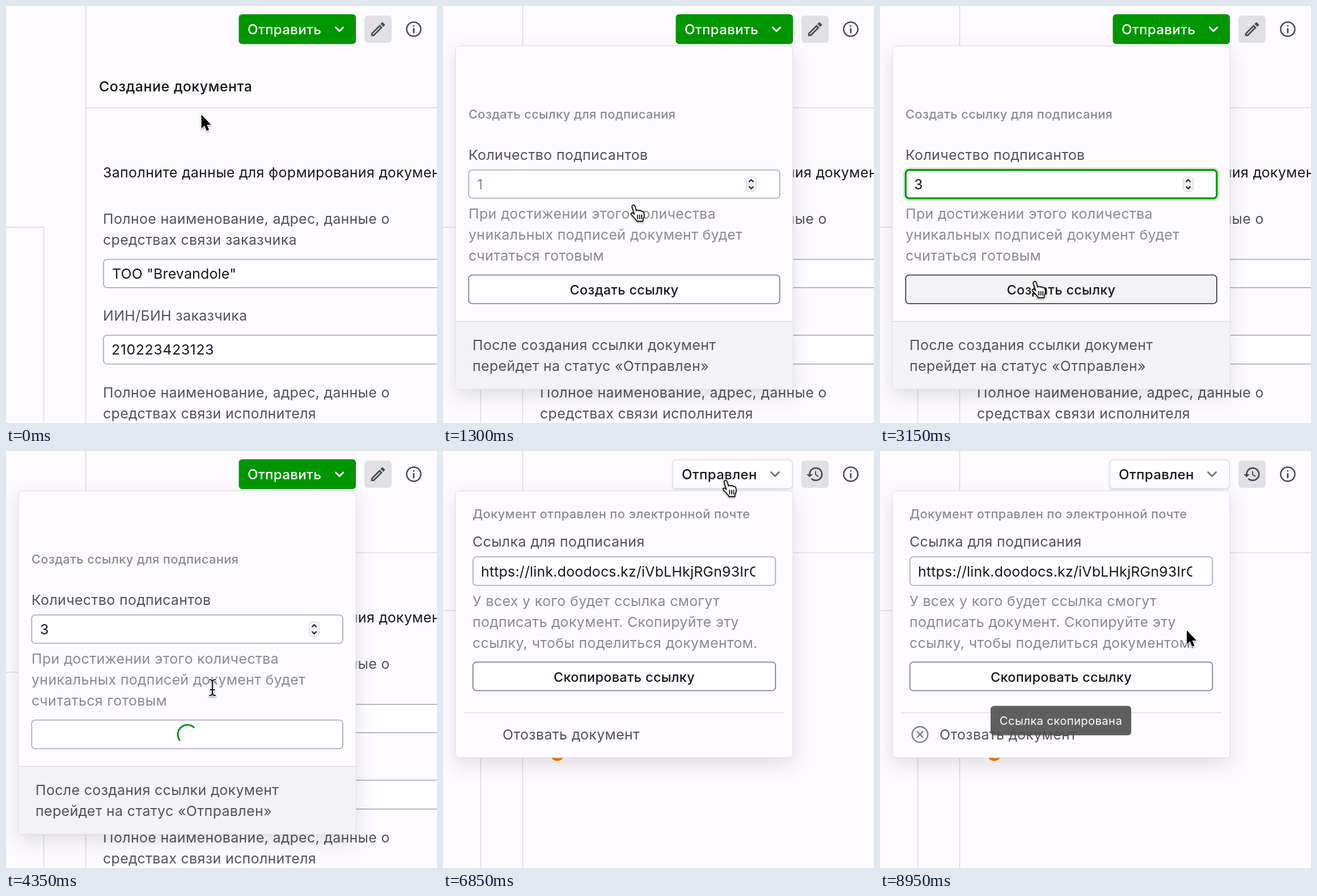
Recreate the animation shown at these times as an HTML page. Size 760 by 737 pixels, loop 9000 ms.

```html
<!DOCTYPE html>
<html lang="ru">
<head>
<meta charset="utf-8">
<title>Отправка документа</title>
<style>
html, body { margin: 0; width: 100%; height: 100%; overflow: hidden; background: #fdfbfe; }
svg { display: block; }
text { font-family: Inter, "Open Sans", sans-serif; font-size: 24.9px; letter-spacing: .38px; fill: #19181b; white-space: pre; }
.med { font-weight: 500; }
.label { fill: #535257; }
.hint { fill: #8b8a8f; }
.small { font-size: 21.8px; }
.btn { font-size: 23.4px; font-weight: 500; letter-spacing: .34px; }
.head { font-size: 24px; font-weight: 500; }
.value { letter-spacing: .2px; }
.digits { letter-spacing: .58px; }
.panel { font-weight: 500; letter-spacing: .57px; }
.title { font-size: 28px; font-weight: 500; letter-spacing: .8px; }
.tip { font-size: 20.2px; letter-spacing: .4px; fill: #fff; }
.line { stroke: #dcdbdf; stroke-width: 1.5; fill: none; }
.box { fill: #fefdff; stroke: #a6a5a9; stroke-width: 1.6; }
.icon { fill: none; stroke: #4b4a4e; stroke-width: 2.5; stroke-linecap: round; stroke-linejoin: round; }
.glyph { fill: #4b4a4e; transform: translate(656px, 41px) scale(1.36) translate(-12px, -12px); }
.card { fill: #fdfbfe; stroke: #dddce0; stroke-width: 1; filter: drop-shadow(0 12px 16px rgba(30,28,40,.13)); }
.raised { filter: drop-shadow(0 2px 2px rgba(30,28,40,.09)); }
.cursor { filter: drop-shadow(0 2px 1.5px rgba(0,0,0,.3)); }
</style>
</head>
<body>
<svg id="stage" width="760" height="737" viewBox="0 0 760 737">
  <defs><clipPath id="urlClip"><rect x="60" y="188" width="490.5" height="48"/></clipPath></defs>
  <rect width="760" height="737" fill="#fdfbfe"/>
  <path class="line" d="M140.5 0V737M140.5 179.700H760"/>

  <g id="draft">
    <path class="line" d="M-2 391H66.500V740"/>
    <rect id="send" x="410.500" y="14.500" width="206.500" height="52.800" rx="6"/>
    <text class="head" x="426" y="50" style="fill:#fff">Отправить</text>
    <path class="icon" style="stroke:#fff;stroke-width:3" d="M581.500 38L588 44.500L594.500 38"/>
    <rect x="632" y="17" width="48" height="48" rx="6" fill="#e1e0e3"/>
    <path class="glyph" d="M14.060 9.020l.92.92L5.920 19H5v-.92l9.060-9.060M17.660 3c-.25 0-.51.1-.7.29l-1.830 1.830 3.750 3.750 1.830-1.830c.39-.39.39-1.020 0-1.410l-2.340-2.340c-.2-.2-.45-.29-.71-.29zm-3.600 3.190L3 17.250V21h3.750L17.810 9.940l-3.750-3.750z"/>
    <text class="panel" x="164" y="151">Создание документа</text>
    <text x="171" y="303">Заполните данные для формирования документа</text>
    <text class="label" x="171" y="385">Полное наименование, адрес, данные о</text>
    <text class="label" x="171" y="422">средствах связи заказчика</text>
    <text class="label" x="171" y="556">ИИН/БИН заказчика</text>
    <text class="label" x="171" y="692">Полное наименование, адрес, данные о</text>
    <text class="label" x="171" y="728.500">средствах связи исполнителя</text>
    <rect class="box" x="172" y="447.800" width="620" height="50" rx="6"/>
    <text class="value" x="187" y="482">ТОО "Brevandole"</text>
    <rect class="box" x="172" y="581.800" width="620" height="51" rx="6"/>
    <text class="digits" x="186" y="616">210223423123</text>
  </g>

  <g id="sent">
    <path id="blank" fill="#f3f2f4" d="M0 282H58Q66 282 66 290V737H0Z"/>
    <path class="line" d="M-2 282H66.500V740"/>
    <rect class="raised" x="405" y="15.500" width="211" height="51" rx="6" fill="#fefdff" stroke="#dddce0" stroke-width="1.300"/>
    <text class="head" x="421" y="50">Отправлен</text>
    <path class="icon" style="stroke:#77767b;stroke-width:3" d="M578.500 37.500L585.500 44.500L592.500 37.500"/>
    <rect x="632" y="17" width="48" height="48" rx="6" fill="#e1e0e3"/>
    <path class="glyph" d="M13 3c-4.970 0-9 4.030-9 9H1l3.890 3.890.07.14L9 12H6c0-3.870 3.130-7 7-7s7 3.130 7 7-3.130 7-7 7c-1.930 0-3.680-.79-4.940-2.060l-1.420 1.420C8.270 19.990 10.510 21 13 21c4.970 0 9-4.030 9-9s-4.030-9-9-9zm-1 5v5l4.280 2.540.72-1.210-3.500-2.080V8H12z"/>
    <text class="panel" x="164" y="151">Отслеживание документа</text>
    <text class="small label" x="163.300" y="233">Документ создан 17.03.2023, 13:40</text>
    <text class="title" x="164" y="333">Подписание</text>
    <path fill="#8b8a8f" d="M357.500 319.500H370.500L364 326.500Z"/>
    <g id="signers"></g>
  </g>

  <g><circle class="icon" cx="719" cy="41" r="12.500"/>
    <path class="icon" style="stroke-width:2.800" d="M719 40.500V47M719 35.200V35.300"/></g>

  <g id="createPop">
    <rect class="card" x="22" y="70.500" width="595" height="607" rx="7"/>
    <path fill="#f3f2f4" d="M22.500 557H616.500V670Q616.500 677 609.500 677H29.500Q22.500 677 22.500 670Z"/>
    <path class="line" d="M22 557.500H617"/>
    <text class="small med hint" x="45" y="199">Создать ссылку для подписания</text>
    <text class="label" x="45" y="272">Количество подписантов</text>
    <rect id="glow" x="43" y="288" width="553" height="54" rx="8" fill="none" stroke="#009600" stroke-opacity=".18" stroke-width="5"/>
    <rect id="count" class="box" x="45.300" y="289.800" width="548.500" height="50" rx="6"/>
    <text id="num" class="value" x="60" y="324"></text>
    <rect x="534.500" y="302" width="18" height="25.500" rx="5" fill="#f4f3f5" stroke="#d3d2d5"/>
    <path class="line" d="M535 314.700H552" style="stroke-width:1"/>
    <path class="icon" style="stroke:#222;stroke-width:2.200" d="M540 310.500L543.500 307L547 310.500M540 319.500L543.500 323L547 319.500"/>
    <text class="hint" x="45" y="376">При достижении этого количества</text>
    <text class="hint" x="45" y="413">уникальных подписей документ будет</text>
    <text class="hint" x="45" y="450">считаться готовым</text>
    <rect id="create" class="box" x="45.300" y="475.500" width="548.500" height="50.500" rx="6"/>
    <text id="createText" class="btn" x="319.500" y="510" text-anchor="middle">Создать ссылку</text>
    <path id="spin" fill="none" stroke="#0a960a" stroke-width="3" d="M-12 12A17 17 0 0 1 13 -11"/>
    <text class="label" x="52" y="608">После создания ссылки документ</text>
    <text class="label" x="52" y="645">перейдет на статус «Отправлен»</text>
  </g>

  <g id="linkPop">
    <rect class="card" x="22" y="70.500" width="595" height="471.500" rx="7"/>
    <text class="small med hint" x="52" y="119">Документ отправлен по электронной почте</text>
    <text class="label" x="52" y="169">Ссылка для подписания</text>
    <rect class="box" x="52.800" y="187" width="533.500" height="50.500" rx="6"/>
    <text class="value" x="67" y="221.500" clip-path="url(#urlClip)">https://link.doodocs.kz/iVbLHkjRGn93IrC</text>
    <text class="hint" x="52" y="273.500">У всех у кого будет ссылка смогут</text>
    <text class="hint" x="52" y="310.500">подписать документ. Скопируйте эту</text>
    <text class="hint" x="52" y="348">ссылку, чтобы поделиться документом.</text>
    <rect id="copy" class="box" x="52.800" y="373" width="533.500" height="50.500" rx="6"/>
    <text class="btn" x="319.500" y="407.500" text-anchor="middle">Скопировать ссылку</text>
    <path class="line" d="M37 462.500H602"/>
    <g id="revoke" class="icon" style="stroke:#7d7c81;stroke-width:2.400"><circle cx="70.500" cy="501" r="13.800"/><path d="M65.500 496L75.500 506M75.500 496L65.500 506"/></g>
    <text class="label" x="105" y="510">Отозвать документ</text>
    <g id="tip">
      <rect x="195" y="450.500" width="248" height="52" rx="6" fill="#4e4e4f" fill-opacity=".9"/>
      <text class="tip" x="319" y="484" text-anchor="middle">Ссылка скопирована</text>
    </g>
  </g>

  <g id="pointer" class="cursor">
    <path id="arrow" d="M0 0V24.500L5.500 19.500L9.300 28.600L13.400 26.800L9.600 17.900H17Z" stroke="#fff" stroke-width="2" paint-order="stroke" stroke-linejoin="round"/>
    <g id="hand" transform="translate(-5 -2)" fill="#fff" stroke="#111" stroke-width="1.800" stroke-linecap="round" stroke-linejoin="round">
      <path d="M4.500 2.200C6 1 8 1.800 8.600 3.800L11 12C11.500 10.300 14.500 10 15.400 12C16.600 10.600 19 11 19.600 13C21.200 12 23.800 13 24 15.400C25 19 25 23 23 26L22.400 30.500H12L10.500 28C8 25 5 22 2 18.500C.5 16.500 3 14.500 5.200 16L7.500 18L3.500 6C3 4.400 3.300 3 4.500 2.200Z"/>
      <path d="M13 19.500V26M16.700 19.500V26M20.300 19.500V26"/>
    </g>
    <g id="beam" fill="none" stroke-linecap="round">
      <path id="beamPath" stroke="#fff" stroke-width="4.500" d="M-5 -14Q0 -14 0 -9V9Q0 14 -5 14M5 -14Q0 -14 0 -9V9Q0 14 5 14M-3.500 4H3.500"/>
    </g>
  </g>
</svg>
<script>
const LOOP = 9000;
const $ = id => document.getElementById(id);
const set = (id, attrs) => { for (const k in attrs) $(id).setAttribute(k, attrs[k]); };
const show = (id, on) => { $(id).style.display = on ? "" : "none"; };
const clamp = v => Math.max(0, Math.min(1, v));
const ramp = (t, from, len) => clamp((t - from) / len);
const ease = p => p * p * (3 - 2 * p);

function fade(id, v) {
  show(id, v > 0);
  $(id).style.opacity = v;
}

// The dark stroke of the text cursor lies over its white halo.
const ink = $("beamPath").cloneNode();
ink.removeAttribute("id");
ink.setAttribute("stroke", "#111");
ink.setAttribute("stroke-width", "2.2");
$("beam").append(ink);

$("signers").innerHTML = [1, 2, 3].map(n => {
  const y = 296 + 67 * n;
  return `<rect x="163.500" y="${y + .5}" width="44.500" height="44" rx="6" fill="#e3e2e5" stroke="#d0cfd2"/>
    <text class="med" x="185.800" y="${y + 32}" text-anchor="middle" style="font-size:26px">П</text>
    <circle cx="201.500" cy="${y + 37.9}" r="14" fill="#fefdff"/>
    <circle cx="201.500" cy="${y + 37.9}" r="10.200" fill="#fefdff" stroke="#f77f00" stroke-width="5.200"/>
    <text x="223.500" y="${y + 32}">Подписант ${n}</text>`;
}).join("");

// start, end, x, y
const moves = [
  [50, 500, 500, 43],
  [950, 1300, 335, 352],
  [1350, 1650, 280, 318],
  [2850, 3130, 272, 487],
  [3520, 4050, 364, 418],
  [4800, 5250, 374, 433],
  [5900, 6300, 500, 43],
  [6800, 7350, 389, 415],
  [8180, 8650, 541, 317]
];
const kinds = [[0, "arrow"], [400, "hand"], [1400, "beam"], [3030, "hand"],
  [3700, "beam"], [4800, "arrow"], [6200, "hand"], [8350, "arrow"]];

function cursorAt(t) {
  let x = 344.6, y = 192;
  for (const [a, b, tx, ty] of moves) {
    const p = ease(ramp(t, a, b - a));
    x += (tx - x) * p;
    y += (ty - y) * p;
  }
  return [x, y];
}

function hoverButton(id, hot, idle) {
  $(id).style.fill = hot ? "#f3f2f5" : "#fefdff";
  $(id).style.stroke = hot ? "#29282c" : idle;
}

function draw(t) {
  const [x, y] = cursorAt(t);
  const kind = kinds.filter(k => k[0] <= t).pop()[1];
  const isSent = t >= 4950;
  const loading = t >= 3450;
  const focused = t >= 1950 && !loading;
  const typed = t >= 2400;

  show("draft", !isSent);
  show("sent", isSent);
  set("send", { fill: y < 67 && x > 411 ? "#008900" : "#009600" });
  $("blank").style.opacity = 1 - ramp(t, 6300, 150);

  fade("createPop", ramp(t, 650, 120) * (1 - ramp(t, 4800, 150)));
  $("count").style.stroke = focused ? "#009600" : "";
  $("count").style.strokeWidth = focused ? 3.2 : "";
  show("glow", focused);
  $("num").textContent = typed ? "3" : "1";
  $("num").style.fill = typed ? "#19181b" : "#8b8a8f";
  hoverButton("create", !loading && t > 2850 && y > 475, loading ? "#a6a5a9" : "#77767b");
  show("createText", !loading);
  show("spin", loading);
  set("spin", { transform: `translate(319 500) rotate(${(t - 4350) * .36})` });

  fade("linkPop", ramp(t, 6450, 120));
  hoverButton("copy", y > 372 && y < 424, "#77767b");
  show("revoke", t >= 7700);
  fade("tip", ramp(t, 8120, 150));

  set("pointer", { transform: `translate(${x.toFixed(2)} ${y.toFixed(2)})` });
  for (const k of ["arrow", "hand", "beam"]) show(k, k === kind);
}

const begin = performance.now();
function tick() {
  draw((performance.now() - begin) % LOOP);
  requestAnimationFrame(tick);
}
tick();
</script>
</body>
</html>
```
